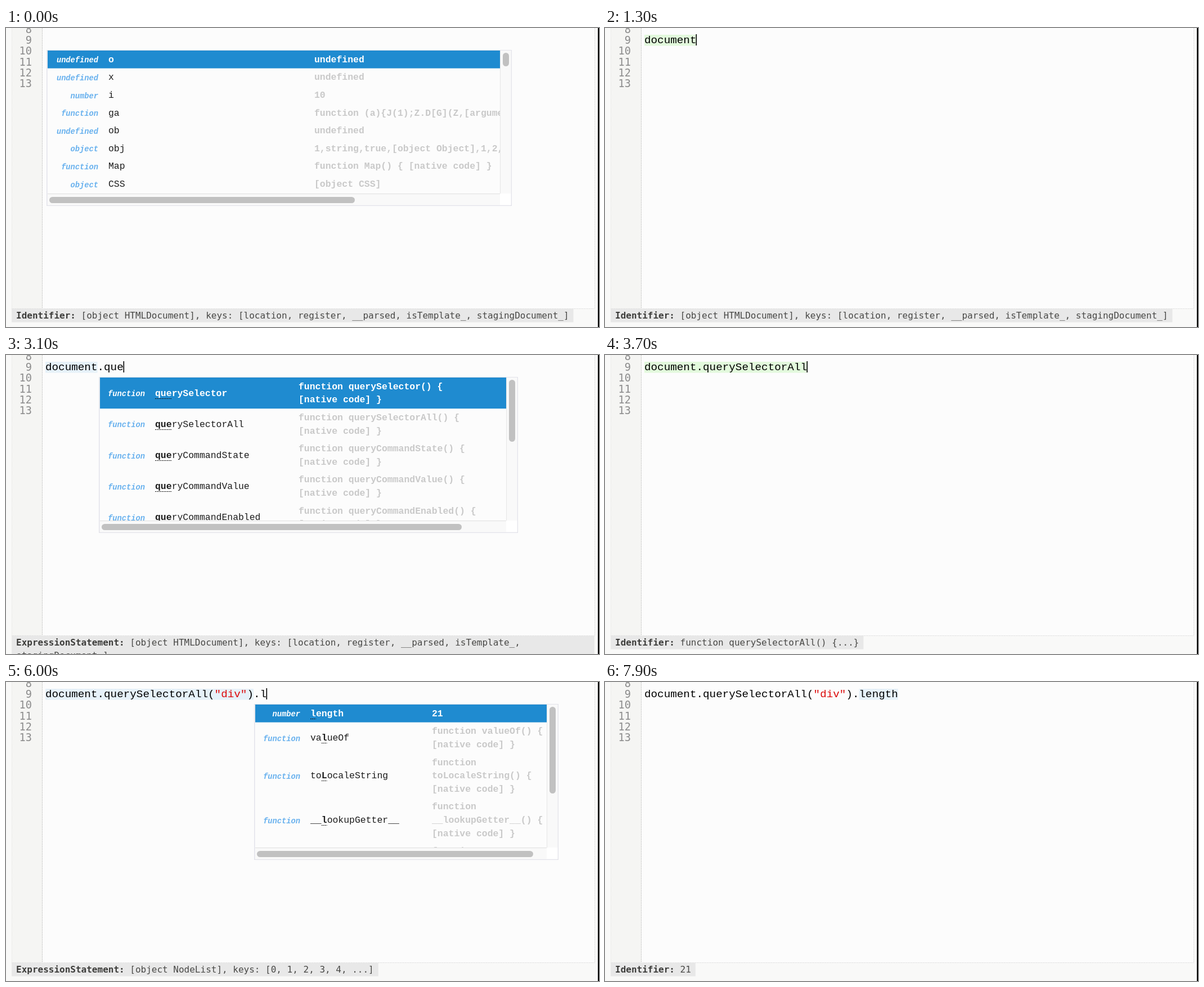
Write an HTML page with a canvas that moves like this. It is 1054 by 531 pixels and loops after 8000 ms.

```html
<!DOCTYPE html>
<html lang="en">
<head>
<meta charset="utf-8">
<title>Live code completion</title>
<style>
html, body { margin: 0; width: 100%; height: 100%; overflow: hidden; background: #f9f9f8; }
canvas { display: block; }
</style>
</head>
<body>
<canvas id="stage" width="1054" height="531"></canvas>
<script>
const ctx = document.getElementById('stage').getContext('2d');
const LOOP = 8000;
const COURIER = '"Liberation Mono", monospace';
const MENLO = '"DejaVu Sans Mono", monospace';
const CODE_SIZE = 19.27, CODE_W = CODE_SIZE * 0.6, CODE_X = 70;
const LIST_SIZE = 16.46, LIST_W = LIST_SIZE * 0.6, LIST_LINE = 23.6;
const GREEN = '#e2f9dc', BLUE = '#e6f1f9';

const native = name => `function ${name}() { [native code] }`;
const native2 = name => [`function ${name}() {`, '[native code] }'];
const native3 = name => ['function', `${name}() {`, '[native code] }'];

// Each row: type, name, then the lines of its value.
const popups = {
  globals: {
    x: 72, right: 899, meta: 92, value: 548, thumbX: 543, thumbY: 24,
    rows: [
      ['undefined', 'o', 'undefined'],
      ['undefined', 'x', 'undefined'],
      ['number', 'i', '10'],
      ['function', 'ga', 'function (a){J(1);Z.D[G](Z,[arguments'],
      ['undefined', 'ob', 'undefined'],
      ['object', 'obj', '1,string,true,[object Object],1,2,3'],
      ['function', 'Map', native('Map')],
      ['object', 'CSS', '[object CSS]'],
      ['function', 'Set', native('Set')]
    ]
  },
  doc: {
    x: 72, right: 535, meta: 82, value: 350, thumbX: 413, thumbY: 136,
    rows: [
      ['object', 'document', '[object', 'HTMLDocument]'],
      ...['Document', 'XMLDocument', 'HTMLDocument'].map(n => ['function', n, ...native3(n)])
    ]
  },
  members: {
    x: 165, right: 991, meta: 91.5, value: 699, thumbX: 757, thumbY: 24,
    rows: [
      ['undefined', 'all', '[object HTMLAllCollection]'],
      ['string', 'URL', 'http://localhost:9000/'],
      ['string', 'dir', ''],
      ['function', 'open', 'function open() { [native code]', '}'],
      ['function', 'bind', 'function (a,b)', '{console.error("Unhandled', 'binding to Node: ",this,a,b)'],
      ['object', 'body', '[object HTMLBodyElement]']
    ]
  },
  query: {
    x: 165, right: 910, meta: 82, value: 520, thumbX: 640, thumbY: 110,
    rows: ['querySelector', 'querySelectorAll', 'queryCommandState', 'queryCommandValue', 'queryCommandEnabled']
      .map(n => ['function', n, ...native2(n)])
  },
  nodes: {
    x: 224, right: 1051, meta: 82, value: 699, thumbX: 560, thumbY: 60,
    rows: Array.from({ length: 9 }, (_, i) => ['object', String(i), '[object HTMLDivElement]'])
  },
  length: {
    x: 441, right: 982, meta: 82, value: 757, thumbX: 491, thumbY: 154,
    rows: [
      ['number', 'length', '21'],
      ['function', 'valueOf', ...native2('valueOf')],
      ...['toLocaleString', '__lookupGetter__', '__lookupSetter__'].map(n => ['function', n, ...native3(n)])
    ]
  }
};

const KEYS = '[object HTMLDocument], keys: [location, register, __parsed, isTemplate_,';
const statuses = {
  document: ['Identifier:', KEYS + ' stagingDocument_]'],
  expression: ['ExpressionStatement:', KEYS, 'stagingDocument_]'],
  method: ['Identifier:', 'function querySelectorAll() {...}'],
  list: ['ExpressionStatement:', '[object NodeList], keys: [0, 1, 2, 3, 4, ...]'],
  count: ['Identifier:', '21']
};

const ALL = 'document.querySelectorAll';
const CALL = ALL + '("div")';

// Each step changes only the listed properties of the state.
const steps = [
  { at: 0, text: '', status: 'document', popup: 'globals', prefix: '', selected: 0 },
  { at: 200, text: 'd', popup: 'doc', prefix: 'd' },
  { at: 300, text: 'do', prefix: 'do' },
  { at: 400, text: 'doc', prefix: 'doc' },
  { at: 900, text: 'document', popup: null, mark: [0, 8, GREEN] },
  { at: 1800, text: 'document.', status: 'expression', mark: [0, 8, BLUE] },
  { at: 1900, popup: 'members', prefix: '' },
  { at: 2500, text: 'document.q', popup: 'query', prefix: 'q' },
  { at: 2700, text: 'document.qu', prefix: 'qu' },
  { at: 2900, text: 'document.que', prefix: 'que' },
  { at: 3300, selected: 1 },
  { at: 3700, text: ALL, popup: null, selected: 0, status: 'method', mark: [0, 25, GREEN] },
  { at: 4300, text: ALL + '()', caret: 26, mark: [9, 25, BLUE] },
  { at: 4500, text: ALL + '("")', caret: 27 },
  { at: 4700, text: ALL + '("d")', caret: 28 },
  { at: 4800, text: ALL + '("di")', caret: 29 },
  { at: 4900, text: CALL, caret: 30 },
  { at: 5100, caret: 31 },
  { at: 5200, text: CALL, status: 'list', mark: [0, 32, GREEN] },
  { at: 5600, text: CALL + '.', mark: [0, 32, BLUE] },
  { at: 5700, popup: 'nodes', prefix: '' },
  { at: 5900, text: CALL + '.l', popup: 'length', prefix: 'l' },
  { at: 6400, text: CALL + '.length', popup: null, status: 'count', mark: [0, 39, GREEN] },
  { at: 7300, mark: [33, 39, BLUE] }
];

function stateAt(time) {
  const state = { mark: null };
  for (const step of steps) {
    if (step.at > time) break;
    if ('text' in step) state.caret = step.text.length;
    if ('text' in step || 'caret' in step) state.typed = step.at;
    Object.assign(state, step);
  }
  return state;
}

function rect(x, y, w, h, color) {
  ctx.fillStyle = color;
  ctx.fillRect(x, y, w, h);
}

function label(str, x, y, font, color, align = 'left') {
  ctx.font = font;
  ctx.fillStyle = color;
  ctx.textAlign = align;
  ctx.fillText(str, x, y);
}

function line(x1, y1, x2, y2, color, dash = []) {
  ctx.strokeStyle = color;
  ctx.lineWidth = 1;
  ctx.setLineDash(dash);
  ctx.beginPath();
  ctx.moveTo(x1, y1);
  ctx.lineTo(x2, y2);
  ctx.stroke();
  ctx.setLineDash([]);
}

function pill(x, y, w, h) {
  ctx.fillStyle = '#c1c1c1';
  ctx.beginPath();
  ctx.roundRect(x, y, w, h, Math.min(w, h) / 2);
  ctx.fill();
}

function drawEditor() {
  rect(0, 0, 1054, 531, '#f9f9f8');
  rect(10, 0, 1037, 499, '#fcfcfc');
  rect(10, 0, 54, 499, '#f5f5f3');
  line(10.5, 0, 10.5, 498, '#e2e2e2', [1, 1]);
  line(64.5, 0, 64.5, 498, '#c4c4c4', [2, 1]);
  line(1046.5, 0, 1046.5, 498, '#dcdcdc', [2, 1]);
  line(10, 498.5, 1047, 498.5, '#dcdcdc', [2, 1]);
  rect(1052, 0, 2, 531, '#000');
  for (let n = 8; n <= 13; n++) {
    label(n, 46, 28 + (n - 9) * 19.3, `18.6px ${MENLO}`, '#8c8c8c', 'right');
  }
}

function drawCode({ text, caret, mark, typed }, time) {
  if (mark) {
    const [from, to, color] = mark;
    rect(CODE_X + from * CODE_W, 12, (to - from) * CODE_W, 19.5, color);
  }
  let x = CODE_X;
  for (const part of text.split(/("[^"]*")/)) {
    label(part, x, 27.3, `${CODE_SIZE}px ${COURIER}`, part[0] === '"' ? '#dc0a0a' : '#000');
    x += part.length * CODE_W;
  }
  const caretOn = Math.floor((time - typed) / 500) % 2 === 0;
  if (text && caretOn) rect(Math.round(CODE_X + caret * CODE_W) - 0.5, 11, 1.6, 20, '#000');
}

function drawName(name, prefix, x, mid, active) {
  const start = prefix ? name.toLowerCase().indexOf(prefix) : -1;
  const from = Math.max(start, 0), to = from + prefix.length;
  const color = active ? '#fff' : '#1c1c1c';
  const put = (str, at, bold) =>
    label(str, x + at * LIST_W, mid + 5, `${bold || active ? 'bold ' : ''}${LIST_SIZE}px ${COURIER}`, color);
  put(name.slice(0, from), 0, false);
  put(name.slice(from, to), from, true);
  put(name.slice(to), to, false);
  if (start >= 0) {
    const y = Math.round(mid + 9) + 0.5;
    line(x + from * LIST_W, y, x + to * LIST_W, y, '#111', [2, 1]);
  }
}

function drawPopup({ popup, prefix, selected }) {
  const { x, right, meta, value, thumbX, thumbY, rows } = popups[popup];
  const left = x + 2, edge = right - 21;
  rect(x, 39, right - x, 277, '#e3e3ea');
  rect(x + 1.5, 40, right - x - 3, 274.5, '#fcfcfc');
  ctx.save();
  ctx.beginPath();
  ctx.rect(left, 40, edge - left, 254);
  ctx.clip();
  const nameX = x + meta + 18;
  let top = 40;
  rows.forEach(([type, name, ...lines], i) => {
    const height = lines.length * LIST_LINE + 8;
    const mid = top + height / 2;
    const active = i === selected;
    if (active) rect(left, top, edge - left, height, '#1f8bd0');
    label(type, x + meta, mid + 5.5, `italic bold 13.72px ${COURIER}`, active ? '#fff' : '#68b1ee', 'right');
    drawName(name, prefix, nameX, mid, active);
    lines.forEach((str, n) => {
      const y = top + 4 + (n + 0.5) * LIST_LINE + 5;
      label(str, value, y, `bold ${LIST_SIZE}px ${COURIER}`, active ? '#fff' : '#c9c9c9');
    });
    top += height;
  });
  ctx.restore();
  rect(edge, 40, 19.5, 254, '#f9f9f9');
  rect(left, 294, edge - left, 20.5, '#f9f9f9');
  rect(edge, 294, 19.5, 20.5, '#fff');
  line(edge + 0.5, 40, edge + 0.5, 294, '#e6e6e6');
  line(left, 294.5, edge, 294.5, '#e0e0e0');
  pill(edge + 5, 44, 11, thumbY);
  pill(x + 5, 300, thumbX, 11);
}

function drawStatus(name) {
  const [title, first, second] = statuses[name];
  const charW = 9.632;
  const width = second ? 1036 : (title.length + 1 + first.length) * charW + 16;
  rect(10, 499, width, second ? 32 : 23.5, '#e8e8e8');
  label(title, 18, 516, `bold 16px ${MENLO}`, '#3c3c3a');
  label(first, 18 + (title.length + 1) * charW, 516, `16px ${MENLO}`, '#484846');
  if (second) label(second, 18, 539, `16px ${MENLO}`, '#484846');
}

function draw(now) {
  const time = now % LOOP;
  const state = stateAt(time);
  drawEditor();
  drawCode(state, time);
  if (state.popup) drawPopup(state);
  drawStatus(state.status);
}

const begin = performance.now();
function tick() {
  draw(performance.now() - begin);
  requestAnimationFrame(tick);
}
tick();
</script>
</body>
</html>
```
